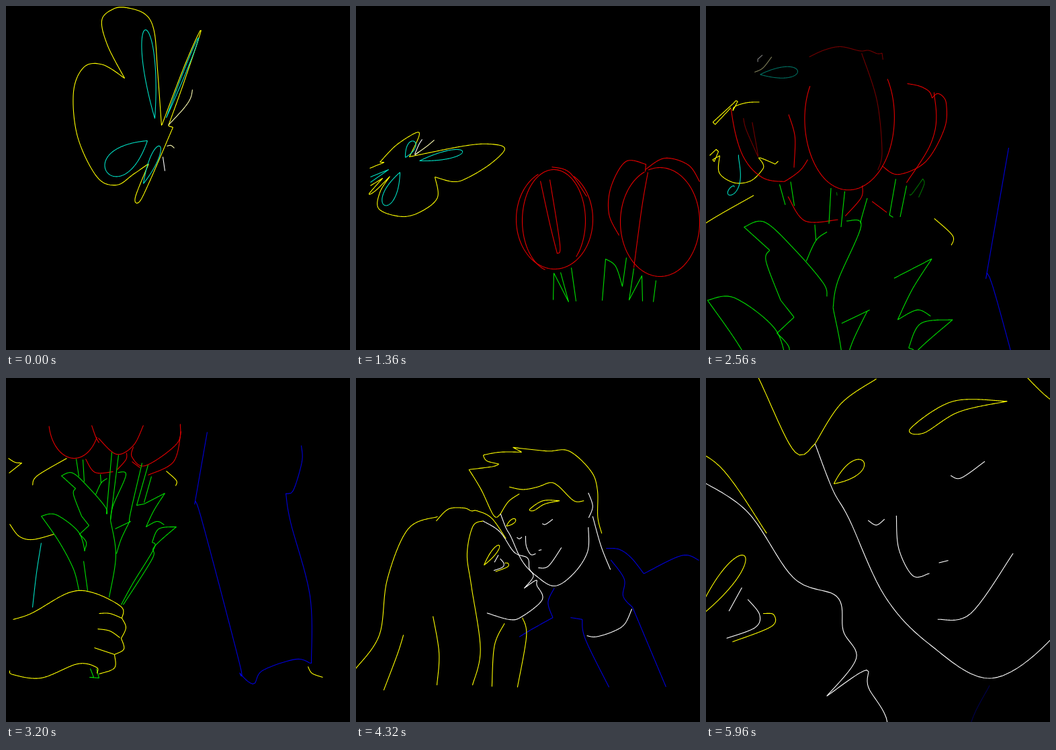
These frames come from a looping animation (512 by 512 pixels, 6 s). An HTML page with a canvas:

```html
<!DOCTYPE html>
<html lang="en">
<head>
<meta charset="utf-8">
<title>Butterfly, tulips, couple</title>
<style>
html, body { margin: 0; width: 100%; height: 100%; overflow: hidden; background: #000; }
canvas { display: block; width: 100vw; height: 100vh; }
</style>
</head>
<body>
<canvas id="stage" width="512" height="512"></canvas>
<script>
const ctx = document.getElementById('stage').getContext('2d');
const LOOP = 6000, N = 200;
const TIMES = [0, 1360, 1920, 3200, 4320, 5000, 5960];
const Y = '#ffff00', C = '#00e0c4', R = '#e60000', G = '#00e000', B = '#0000dc', W = '#ffffff', P = '#ffffb4';

// Camera moves [scale, dx, dy] for strokes before, or after, the scenes they belong to.
const ENTER = { 1: [1, 520, 0], 2: [.63, 300, 140], 3: [2.63, -187, 129], 4: [1.5, -60, -640] };
const LEAVE = { 1: [1, -230, 0], 2: [.38, 71, -49], 3: [.9, -60, 420], 5: [1.755, -193.5, -193] };
// The kiss: where each close-up face sits one scene earlier.
const MAN = [.54, 106, 113], WOMAN = [.535, 137, 110];

const range = f => Array.from({ length: N }, (_, i) => f(i / (N - 1)));

// Elliptic arc between two angles in degrees, clockwise on screen.
const arc = (cx, cy, rx, ry, from, to) => range(u => {
  const a = (from + (to - from) * u) * Math.PI / 180;
  return [cx + rx * Math.cos(a), cy + ry * Math.sin(a)];
});

// Teardrop from its tip to its round end, w = half width.
const drop = (x, y, ex, ey, w) => range(u => {
  const a = u * 2 * Math.PI, len = Math.hypot(ex - x, ey - y);
  const along = (1 - Math.cos(a)) / 2, side = 1.3 * w / len * Math.sin(a) * Math.sin(a / 2);
  return [x + (ex - x) * along + (ey - y) * side, y + (ey - y) * along - (ex - x) * side];
});

// Smooth curve through "x,y" points; "!" marks a corner.
function curve(text) {
  const pts = text.split(' ').map(s => {
    const [x, y] = s.replace('!', '').split(',').map(Number);
    return { x, y, corner: s.endsWith('!') };
  });
  const fine = [[pts[0].x, pts[0].y]];
  for (let i = 0; i + 1 < pts.length; i++) {
    const b = pts[i], c = pts[i + 1];
    const a = b.corner || !i ? b : pts[i - 1];
    const d = c.corner || i + 2 >= pts.length ? c : pts[i + 2];
    for (let k = 1; k <= 10; k++) {
      const u = k / 10;
      const mix = q => b[q] + .5 * u * (c[q] - a[q] + u * (2 * a[q] - 5 * b[q] + 4 * c[q] - d[q]
        + u * (3 * (b[q] - c[q]) + d[q] - a[q])));
      fine.push([mix('x'), mix('y')]);
    }
  }
  const dist = [0];
  for (let i = 1; i < fine.length; i++)
    dist.push(dist[i - 1] + Math.hypot(fine[i][0] - fine[i - 1][0], fine[i][1] - fine[i - 1][1]));
  let j = 0;
  return range(v => {
    const want = v * dist[dist.length - 1];
    while (j < fine.length - 2 && dist[j + 1] < want) j++;
    const u = (want - dist[j]) / (dist[j + 1] - dist[j] || 1);
    return [0, 1].map(q => fine[j][q] + (fine[j + 1][q] - fine[j][q]) * u);
  });
}

const move = (pts, [s, dx, dy]) => pts.map(([x, y]) => [x * s + dx, y * s + dy]);
const shape = p => typeof p === 'string' ? curve(p) : p;
const strokes = [];

// Poses are given for consecutive scenes, beginning with scene `first`.
function add(color, first, ...poses) {
  const keys = [], last = first + poses.length - 1;
  poses.forEach((p, i) => keys[first + i] = shape(p));
  if (ENTER[first]) keys[first - 1] = move(keys[first], ENTER[first]);
  if (LEAVE[last]) keys[last + 1] = move(keys[last], LEAVE[last]);
  strokes.push({ color, first, last, keys });
}
const each = (color, first, list) => list.forEach(p => add(color, first, p));
const face = (view, color, list) => list.forEach(p => {
  const pts = shape(p);
  add(color, 4, move(pts, view), pts);
});

// Butterfly
add(Y, 0,
  '177,108! 152,60 143,22 160,5 180,3 208,13 221,38 226,95 232,179! 268,85 291,36 265,115 242,179! 249,181',
  '21,242 43,233! 36,233! 60,208 90,189 94,195 80,225! 160,209 200,206 222,213 200,236 165,257 145,262 118,255',
  '156,167 120,165 88,169 69,176 64,186! 74,158! 67,156! 6,213! 14,219! 70,162',
  '4,120 14,126 24,127! 5,142');
add(Y, 0,
  '177,108 145,88 117,91 101,128 107,195 136,255 165,267 190,251 213,235! 193,285 199,292 215,260 249,181',
  '118,255! 122,285 100,305 70,314 35,303 36,278 51,254! 30,275 20,280 40,257! 22,268',
  '144,230! 137,238! 105,219 97,217! 115,234 116,250 90,281 49,286 14,258 24,212! 6,228! 12,235! 28,210! 22,205! 6,228',
  '72,233 40,241 20,236 6,218');
add(C, 0, drop(222, 168, 208, 36, 9), drop(74, 226, 87, 202, 6));
add(C, 0, drop(239, 167, 287, 48, 2), drop(95, 231, 159, 217, 6), drop(66, 184, 147, 177, 12));
add(C, 0, drop(211, 201, 151, 248, 19), drop(66, 248, 43, 297, 9), drop(45, 198, 35, 268, 16), '53,246 46,290 40,342');
add(C, 0, drop(205, 265, 229, 209, 6), '22,255 49,244! 22,263');
add(P, 0, '278,125 275,138 265,153 242,178', '117,200 105,210 88,222', '91,146 72,170 54,179');
add(W, 0, '234,225 237,246', '99,199 94,207 88,221', '71,142 61,151! 61,157');
add(P, 0, '240,209 246,208 251,212', '94,218 88,222');

// Tulips
add(R, 1, arc(296, 318, 57, 74, 245, -60),
  '11,235 28,335 65,392 114,411! 150,391 168,370', arc(102, 62, 38, 58, 170, 27));
add(R, 1, arc(295, 320, 47, 76, 106, 405));
add(R, 2, '119,253 134,310 124,385', '128,71 134,88 139,97');
add(R, 1, '275,261 289,325 300,369! 304,355 289,259', '30,278 36,303 60,358! 61,355 49,287');
add(R, 1, '292,240 318,248 344,284');
add(R, 1, '392,342 377,310 380,270 402,232 432,236! 431,247');
add(R, 1, arc(453, 322, 59, 81, 247, -107), arc(255, 262, 107.5, 175, 220, -41), '138,90 165,114 190,101 205,71');
add(R, 1, '435,248 426,300 414,390', '285,138 318,240 329,350 320,390');
add(R, 1, '431,244 460,227 495,237 512,262', '172,146! 205,131 240,124 281,133 300,132 319,139 329,138! 331,152');
add(R, 2,
  '340,163 375,160 405,167 416,182! 434,163 455,165 473,185 482,245 450,332 385,385 335,374',
  '260,69 255,98 208,131 188,118 190,103');
add(R, 2, '419,178 428,255 386,382', '261,80 250,125 212,145');
each(R, 3, ['119,121 133,141 160,140', '166,137 179,122 180,112', '188,125 200,134']);

// Stems and leaves
add(G, 1, '294,438 295,398! 317,441! 305,397', '115,411 128,446', '105,121 109,147');
add(G, 1, '321,390 328,440', '138,402 147,441', '115,122 117,155');
add(G, 1, '367,439 372,377! 387,388 397,418! 403,375', '215,432 217,446', '158,111 150,203');
add(G, 1, '427,440 426,402! 407,438! 414,391', '246,438 247,447', '168,115 156,212');
add(G, 1, '443,441 447,409', '277,433 278,446', '186,214! 185,205 203,127');
add(G, 2, '354,386 352,442', '212,130 195,190! 206,188');
add(G, 2, '381,389 373,443', '217,147 206,186');
each(G, 2, ['231,438 232,445', '388,443 394,441 417,409! 420,420 408,449']);
each(G, 3, [
  '83,146 100,142 125,165 148,192 151,203',
  '83,146! 104,165! 101,174 113,206! 124,220! 110,233! 120,245 117,258',
  '151,150 142,157 134,174', '141,144 142,157',
  '156,212 164,265 154,327',
  '118,258 108,229 75,204 53,206! 80,245 101,285 109,316',
  '116,273 122,317',
  '167,141 179,145 160,190 156,212',
  '163,225 186,214', '184,215 172,240 165,262',
  '206,188 237,172! 221,197 209,222! 225,214 236,219',
  '254,222! 228,225 218,245! 221,254 190,305 172,338',
  '254,222! 221,252 218,270 175,338',
  '126,433 131,446! 125,446! 139,447! 135,433'
]);

// Hand and sleeve
each(Y, 3, [
  '40,160 47,146 91,120', '239,139 254,153 253,161',
  '11,360 40,350 94,320 130,320 172,341 173,358! 179,372 172,388! 176,404 162,412! 162,432 139,441',
  '139,351 155,351 173,358', '137,374 155,377 170,387', '132,402 162,412',
  '6,436 11,442 53,447 107,426 135,431 136,440', '450,430 456,440 472,446'
]);
add(B, 3, '300,81 281,190! 290,205 348,425 349,440 369,456 382,436 432,419 455,426! 453,325 424,215 417,172! 428,168 441,125 440,101');

// Man
face(MAN, Y, [
  '203,166 185,172 150,100 116,44! 180,36 199,29! 165,20 155,4! 202,-4 262,-4! 237,-17! 331,-7 392,-7 452,48 470,100 471,175 482,220',
  '255,111 225,132 203,166',
  '227,92 265,99 305,92 340,80 363,90 405,130 433,130',
  '366,130! 320,130 284,153 295,157 325,139 366,130',
  drop(219, 200, 244, 181, 6)
]);
face(MAN, W, [
  '318,193 327,195 347,181', '248,231 255,235 262,230',
  '272,227 274,255 286,278 300,276', '308,267 316,265',
  '307,315 335,310 371,259',
  '203,166 218,205 232,230 262,295 300,336 352,365 405,330 443,270 445,203',
  '445,108 457,145 446,177', '457,173 480,255 506,320',
  '565,428 545,470 512,491 466,505 441,502'
]);
face(MAN, B, [
  '351,371 334,410 347,452! 288,485 255,505', '396,452 428,457! 437,512 502,644',
  '494,261 530,264 563,287 598,331! 702,281 750,294', '507,293 544,346 541,393 567,424! 659,643'
]);

// Woman
face(WOMAN, W, [
  '98,193 145,223 185,280 222,296 227,325 238,348 213,380! 246,358 248,372 263,412 205,460 170,467 109,449',
  '130,308 141,288', '146,298 156,311 152,322 128,331'
]);
face(WOMAN, Y, [
  '-32,193 2,160 45,157 66,165 82,165 122,185 162,242',
  '69,650 91,550 66,375 54,285 70,208 98,193',
  drop(101, 316, 143, 261, 7),
  '159,310 168,311 166,321 133,334',
  '-256,604 -190,510 -168,355 -110,215 -28,181',
  '-41,458 -24,561 -30,650', '-123,510 -140,564 -178,664',
  '158,478 130,540 123,654', '208,462 219,514 194,656'
]);

function flutter([x, y], p) {
  const loop = Math.sin(p * Math.PI), flap = 1 - .3 * Math.sin(p * Math.PI * 4) ** 2;
  const mid = 190 - 70 * p;
  return [mid + (x - mid) * flap + 170 * loop, y + 40 * loop];
}

function opacity({ color, first, last }, k, p) {
  if (color === B && k > 3) return k === 4 ? 1 - .2 * p : .8 - .45 * p;
  if (k === last && k < 4) return 1 - p;
  return k < first ? Math.min(1, 4 * p) : 1;
}

function draw(ms) {
  const step = ms < 4560 ? 80 : 40, t = Math.floor(ms / step) * step;
  let k = 0;
  while (k < 5 && t >= TIMES[k + 1]) k++;
  const start = k === 4 ? 4480 : TIMES[k];
  const p = Math.max(0, (t - start) / (TIMES[k + 1] - start));

  ctx.globalAlpha = 1;
  ctx.fillStyle = '#000';
  ctx.fillRect(0, 0, 512, 512);
  ctx.save();
  if (t >= 2640 && t < 4480) {
    ctx.beginPath();
    ctx.rect(0, 67, 512, 399);
    ctx.clip();
  }
  ctx.translate(-.5, -.5);
  ctx.lineWidth = 1.1;
  ctx.lineJoin = 'round';
  for (const s of strokes) {
    const a = s.keys[k], b = s.keys[k + 1];
    if (!a || !b) continue;
    ctx.globalAlpha = opacity(s, k, p);
    ctx.strokeStyle = s.color;
    ctx.beginPath();
    a.forEach(([x, y], i) => {
      let q = [x + (b[i][0] - x) * p, y + (b[i][1] - y) * p];
      if (k === 0 && s.first === 0) q = flutter(q, p);
      ctx.lineTo(q[0], q[1]);
    });
    ctx.stroke();
  }
  ctx.restore();
}

const begin = performance.now();
function tick() {
  draw((performance.now() - begin) % LOOP);
  requestAnimationFrame(tick);
}
tick();
</script>
</body>
</html>
```
